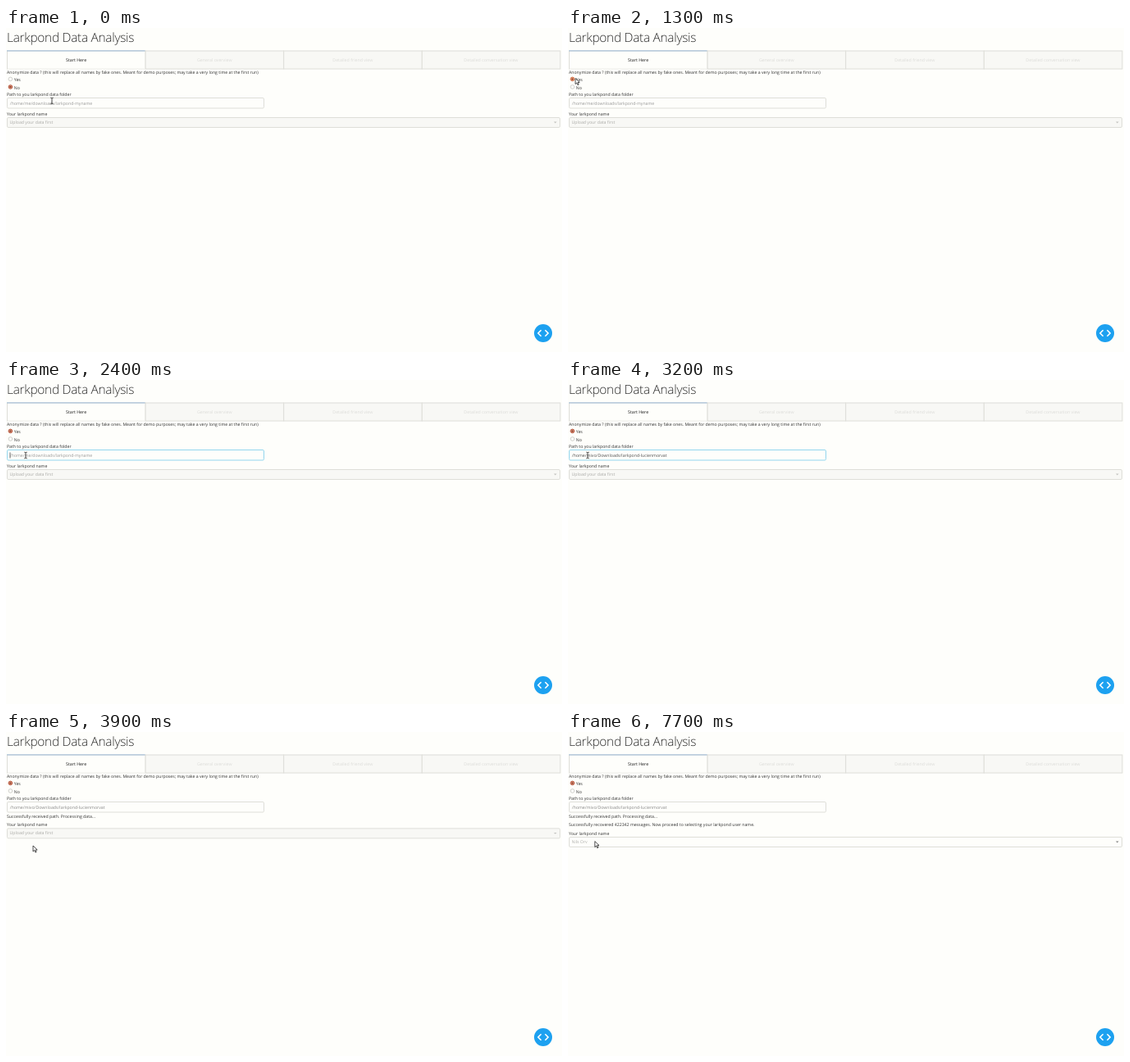
These frames come from a looping animation (678 px wide and 396 px high, 8 s). An HTML page:

```html
<!DOCTYPE html>
<html lang="en">
<head>
<meta charset="utf-8">
<title>Larkpond Data Analysis</title>
<style>
  html, body { margin: 0; width: 100%; height: 100%; overflow: hidden; background: #fefefb; }
  svg { display: block; width: 678px; height: 396px; }
  text { font: 5.19px "Open Sans", sans-serif; fill: #323232; text-rendering: geometricPrecision; }
  .title { font-size: 15.43px; font-weight: 300; letter-spacing: -.28px; fill: #2a2a2a; }
  .tab { font-size: 5.3px; text-anchor: middle; fill: #1c1c1c; }
  .off { fill: #dcdcd9; }
  .box { fill: #fefefb; stroke: #deded9; }
  .disabled { fill: #f8f8f5; }
</style>
</head>
<body>
<svg viewBox="0 0 678 396">
  <text class="title" x="1" y="17.2">Larkpond Data Analysis</text>

  <g id="tabs"></g>

  <text x="1" y="56.4">Anonymize data ? (this will replace all names by fake ones. Meant for demo purposes; may take a very long time at the first run)</text>
  <g id="yes" transform="translate(5.4 62.4)"></g>
  <text x="9.8" y="65.2">Yes</text>
  <g id="no" transform="translate(5.4 72)"></g>
  <text x="9.8" y="74.7">No</text>

  <text x="1" y="83">Path to you larkpond data folder</text>
  <rect id="field" class="box" x="1.5" y="85.5" width="313" height="12.5" rx="1.4"/>
  <text id="path" x="4.8" y="93.6"></text>
  <path id="caret" d="M5 88.5v7" stroke="#333" stroke-width=".7"/>

  <text id="received" x="1" y="104.6">Successfully received path. Processing data...</text>
  <text id="recovered" x="1" y="115.3">Successfully recovered 422342 messages. Now proceed to selecting your larkpond user name.</text>

  <g id="chooser">
    <text x="1" y="106.9">Your larkpond name</text>
    <rect id="select" class="box" x="1.5" y="109.5" width="674" height="12" rx="1.4"/>
    <text id="choice" x="4.5" y="117"></text>
    <path id="arrow" d="M668 114.6h3.6l-1.8 1.8z"/>
  </g>

  <circle cx="655" cy="373" r="11" fill="#1da1f0"/>
  <path d="M652.6 369.3l-3.7 3.7 3.7 3.7M657.4 369.3l3.7 3.7-3.7 3.7" fill="none" stroke="#fff" stroke-width="1.6"/>

  <path id="pointer" d="M0 0v7.1l1.7-1.6 1.2 2.7 1.2-.6-1.2-2.6h2.3z" fill="#fff" stroke="#222" stroke-width=".8"/>
  <path id="beam" d="M-1.7-3.8q1.7 0 1.7 1v5.6q0 1-1.7 1M1.7-3.8q-1.7 0-1.7 1M1.7 3.8q-1.7 0-1.7-1" fill="none" stroke="#333" stroke-width=".9"/>
</svg>

<script>
const LOOP = 8000, STEP = 100;
const $ = id => document.getElementById(id);
const show = (id, visible) => { $(id).style.display = visible ? "" : "none"; };

// Mouse route: time, x, y
const route = [
  [0, 56, 89], [500, 25, 70], [700, 10, 60], [900, 8.5, 60.5], [1100, 9, 61.5],
  [1600, 9, 61.5], [1900, 13, 74], [2300, 24, 92], [3400, 24, 92],
  [3600, 29, 122], [3800, 32.5, 138.5], [3900, 33, 139],
  [7400, 33, 139], [7700, 32.8, 133.6]
];

function mouseAt(time) {
  const next = route.findIndex(point => point[0] > time);
  if (next < 0) return route.at(-1).slice(1);
  const [t0, x0, y0] = route[next - 1], [t1, x1, y1] = route[next];
  const part = (time - t0) / (t1 - t0);
  return [x0 + (x1 - x0) * part, y0 + (y1 - y0) * part];
}

const tabNames = ["Start Here", "General overview", "Detailed friend view", "Detailed conversation view"];
$("tabs").innerHTML = tabNames.map((name, i) => {
  const x = 1.5 + i * 168.6, middle = x + 84.1;
  return `<rect class="box ${i ? "disabled" : ""}" x="${x}" y="28" width="168.6" height="22"/>
    <text class="tab ${i ? "off" : ""}" x="${middle}" y="40.9">${name}</text>`;
}).join("") +
  `<path d="M1 27.9h168.6" stroke="#86abd0" stroke-width=".8"/>
   <path d="M2 50h167.6" stroke="#fefefb" stroke-width="1.2"/>`;

function drawRadio(id, checked, hover) {
  $(id).innerHTML = checked
    ? `<circle r="2.3" fill="${hover ? "#f0a480" : "#e39a84"}" stroke="${hover ? "#c9663c" : "#ad4a30"}" stroke-width=".9"/>
       <circle r="1" fill="#7d2f1a"/>`
    : `<circle r="2.3" fill="#fefefb" stroke="${hover ? "#a5a5a2" : "#bcbcb9"}" stroke-width=".7"/>`;
}

function render(time) {
  const anonymize = time >= 1300;
  const focused = time >= 2400 && time < 3800;
  const entered = time >= 3200;
  const received = time >= 3900;
  const recovered = time >= 6900;
  const [x, y] = mouseAt(time);

  const overYes = x < 19 && y > 58 && y < 67;
  const overNo = x < 19 && y >= 67 && y < 77;
  drawRadio("yes", anonymize, overYes);
  drawRadio("no", !anonymize, overNo);

  $("field").style.stroke = focused ? "#93d6ee" : "";
  $("path").textContent = entered ? "/home/mivo/Downloads/larkpond-lucienmorvat" : "/home/me/downloads/larkpond-myname";
  $("path").style.fill = received ? "#888" : entered ? "#505050" : "#999";
  show("caret", focused && !entered);

  show("received", received);
  show("recovered", recovered);
  $("chooser").setAttribute("transform", `translate(0 ${recovered ? 19 : received ? 8.4 : 0})`);
  $("select").classList.toggle("disabled", !recovered);
  $("choice").textContent = recovered ? "Nils Orv" : "Upload your data first";
  $("choice").style.fill = recovered ? "#b0b0ad" : "#aaaaa7";
  $("arrow").style.fill = recovered ? "#888" : "#c4c4c1";

  const overField = y > 85 && y < 98;
  show("beam", overField);
  show("pointer", !overField);
  $(overField ? "beam" : "pointer").setAttribute("transform", `translate(${x} ${y})`);
}

const start = performance.now();
function tick() {
  const time = (performance.now() - start) % LOOP;
  render(Math.floor(time / STEP) * STEP);
  requestAnimationFrame(tick);
}
tick();
</script>
</body>
</html>
```
